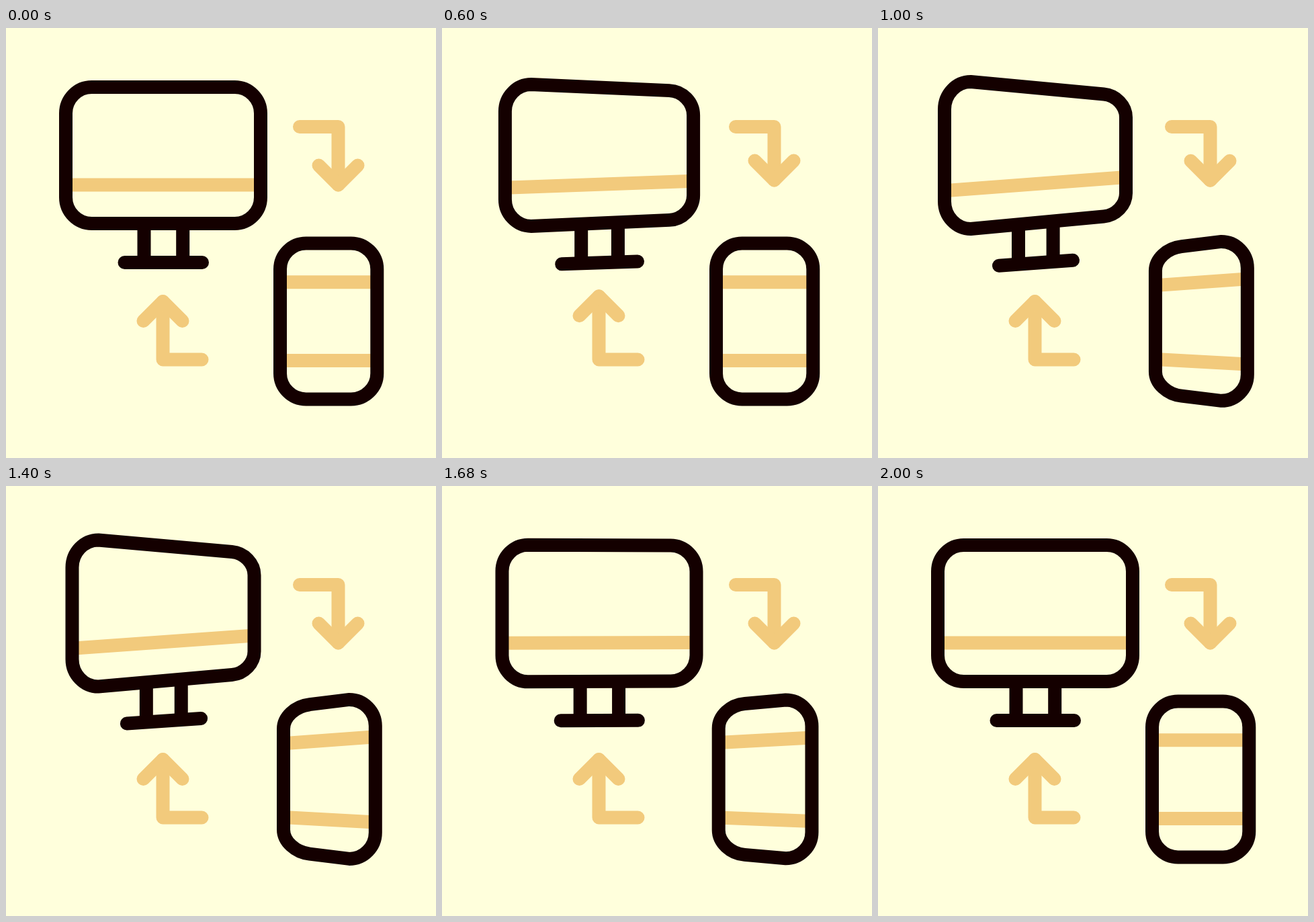
Write an HTML page with a canvas that moves like this. It is 640 px wide and 640 px high and loops after 2.12 s.

```html
<!DOCTYPE html>
<html lang="en">
<head>
<meta charset="utf-8">
<title>Device sync</title>
<style>
html, body { margin: 0; width: 100%; height: 100%; overflow: hidden; background: #ffffdc; }
canvas { display: block; width: 100vmin; height: 100vmin; }
</style>
</head>
<body>
<canvas id="stage" width="640" height="640"></canvas>
<script>
const ctx = document.getElementById('stage').getContext('2d');
const BG = '#ffffdc', DARK = '#140000', GOLD = '#f2ca7c';
const LOOP = 2120, STEP = 40, TURN = 500, LAG = 200;

const clamp = v => Math.min(1, Math.max(0, v));
const mix = (a, b, p) => a + (b - a) * p;
const smooth = u => u * u * (3 - 2 * u);

// cubic-bezier(.6, 0, .25, 1), solved by bisection
function ease(x) {
  if (x <= 0 || x >= 1) return clamp(x);
  let lo = 0, hi = 1, u = 0.5;
  for (let i = 0; i < 24; i++) {
    u = (lo + hi) / 2;
    const v = 1 - u;
    if (1.8 * u * v * v + 0.75 * u * u * v + u * u * u < x) lo = u; else hi = u;
  }
  return smooth(u);
}

// 0 = facing front, 1 = turned
const turned = t => ease((t - 380) / TURN) - ease((t - 1300) / TURN);

// Arrow length change: [time, amount]
const BOB = [[100, 0], [400, 7], [580, -8], [820, 7], [960, 0]];
function bob(t) {
  for (let i = 1; i < BOB.length; i++) {
    const [t0, a] = BOB[i - 1], [t1, b] = BOB[i];
    if (t >= t0 && t < t1) return mix(a, b, smooth((t - t0) / (t1 - t0)));
  }
  return 0;
}

function line(color, points, cap = 'round') {
  ctx.strokeStyle = color;
  ctx.lineCap = cap;
  ctx.beginPath();
  points.forEach(([x, y]) => ctx.lineTo(x, y));
  ctx.stroke();
}

// Each side: x = edge, e = corner end on the top line, h = half height at e,
// s = half length of the straight edge, v = half height of the corner point
const blend = (a, b, p) => Object.fromEntries(Object.keys(a).map(k => [k, mix(a[k], b[k], p)]));

function frame(cy, l, r) {
  const K = 0.55;
  const ctl = s => ({ hx: mix(s.e, s.x, K), hy: mix(s.h, s.v, K), vy: mix(s.s, s.v, K) });
  const a = ctl(l), b = ctl(r);
  ctx.strokeStyle = DARK;
  ctx.beginPath();
  ctx.moveTo(l.e, cy - l.h);
  ctx.lineTo(r.e, cy - r.h);
  ctx.bezierCurveTo(b.hx, cy - b.hy, r.x, cy - b.vy, r.x, cy - r.s);
  ctx.lineTo(r.x, cy + r.s);
  ctx.bezierCurveTo(r.x, cy + b.vy, b.hx, cy + b.hy, r.e, cy + r.h);
  ctx.lineTo(l.e, cy + l.h);
  ctx.bezierCurveTo(a.hx, cy + a.hy, l.x, cy + a.vy, l.x, cy + l.s);
  ctx.lineTo(l.x, cy - l.s);
  ctx.bezierCurveTo(l.x, cy - a.vy, a.hx, cy - a.hy, l.e, cy - l.h);
  ctx.closePath();
  ctx.stroke();
}

const bar = (l, r, y0, y1) => line(GOLD, [[l.x, y0], [r.x, y1]], 'butt');

function monitor(p) {
  const l = blend({ x: 89, e: 127.5, h: 101.5, s: 62.5, v: 101.5 },
                  { x: 99, e: 138, h: 109.5, s: 68.5, v: 109.5 }, p);
  const r = blend({ x: 379, e: 340.5, h: 101.5, s: 62.5, v: 101.5 },
                  { x: 369, e: 336, h: 91, s: 56.5, v: 88 }, p);
  bar(l, r, mix(233.4, 242.2, p), mix(233.4, 222, p));
  const x0 = mix(176.5, 180, p), y0 = mix(349, 353.8, p);
  const x1 = mix(292, 290, p), y1 = mix(349, 345.8, p);
  for (const x of [mix(205.5, 209, p), mix(263.2, 260.6, p)]) {
    line(DARK, [[x, 291], [x, mix(y0, y1, (x - x0) / (x1 - x0))]], 'butt');
  }
  line(DARK, [[x0, y0], [x1, y1]]);
  frame(189.5, l, r);
}

function phone(p) {
  const l = blend({ x: 408, e: 446.5, h: 116, s: 77.5, v: 116 },
                  { x: 413, e: 452, h: 111.2, s: 75, v: 106.8 }, p);
  const r = blend({ x: 552.3, e: 513.5, h: 116, s: 77.5, v: 116 },
                  { x: 549.8, e: 511, h: 118.5, s: 79.3, v: 118.5 }, p);
  bar(l, r, mix(378.2, 383.2, p), mix(378.2, 373.3, p));
  bar(l, r, mix(495, 493, p), mix(495, 500.5, p));
  frame(436.4, l, r);
}

// dir: 1 points down, -1 points up
function arrow(x0, x, y0, tip, dir) {
  line(GOLD, [[x0, y0], [x, y0], [x, tip]]);
  line(GOLD, [[x - 29, tip - 29 * dir], [x, tip], [x + 29, tip - 29 * dir]]);
}

function draw(t) {
  ctx.fillStyle = BG;
  ctx.fillRect(0, 0, 640, 640);
  ctx.lineWidth = 20;
  ctx.lineJoin = 'round';
  arrow(437, 494.5, 147, 233.5 - bob(t - LAG), 1);
  arrow(291.5, 233.5, 493.5, 407 + bob(t), -1);
  monitor(turned(t));
  phone(turned(t - LAG));
}

const start = performance.now();
function tick() {
  const t = (performance.now() - start) % LOOP;
  draw(Math.min(2000, Math.floor(t / STEP) * STEP));
  requestAnimationFrame(tick);
}
tick();
</script>
</body>
</html>
```
